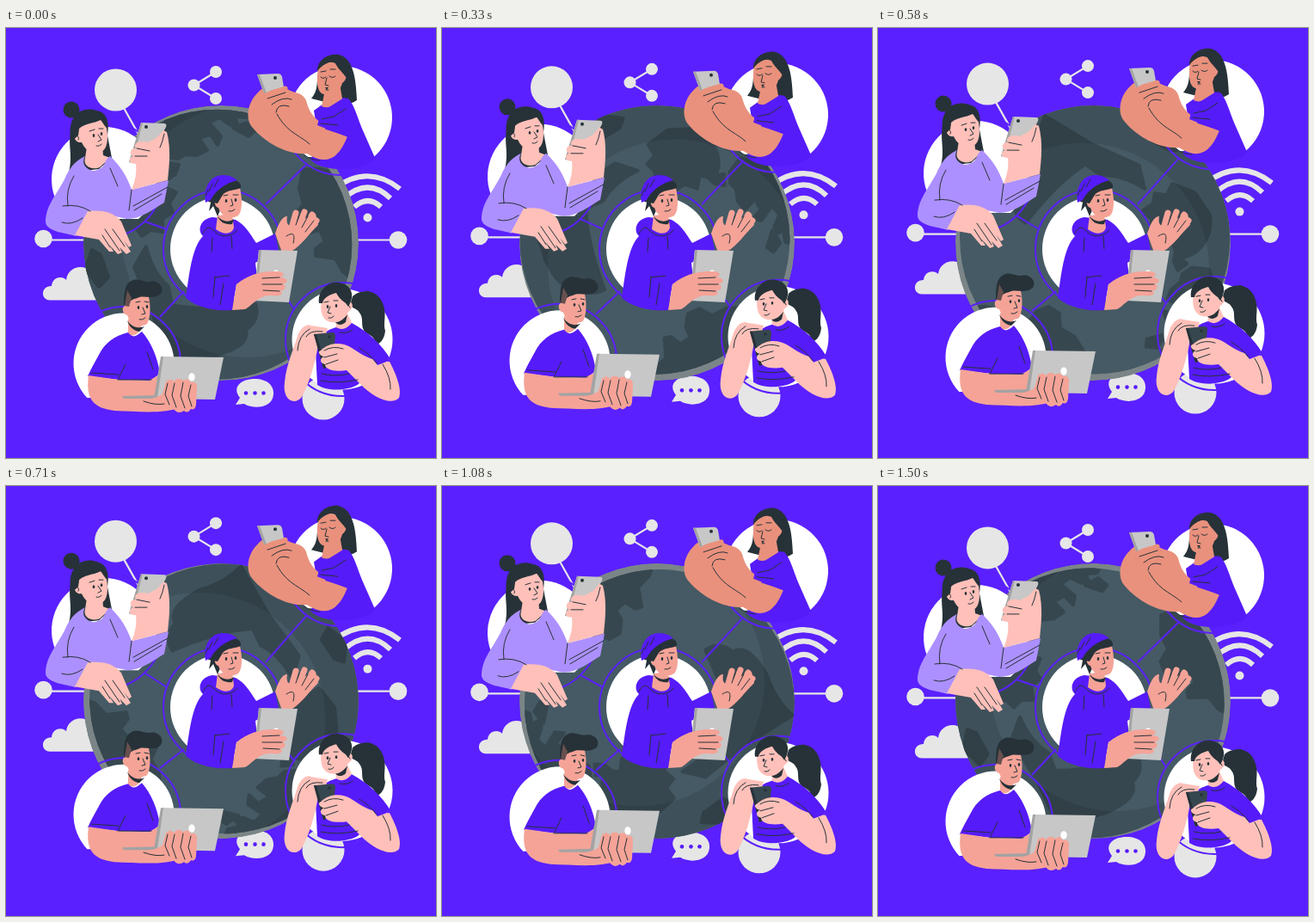
An HTML page for the animation above (1.54 s loop, 500 by 500 pixels).

```html
<!DOCTYPE html>
<html lang="en">
<head>
<meta charset="utf-8">
<title>Connected people</title>
<style>
html, body { margin: 0; width: 100%; height: 100%; overflow: hidden; background: #5a20ff }
svg { display: block; width: 100%; height: 100% }
.ink { fill: #263238 }
.line { fill: none; stroke: #263238; stroke-width: 1; stroke-linecap: round; stroke-linejoin: round }
.ring { fill: none; stroke: #5a20ff; stroke-width: 2 }
.top { fill: #561bf9 }
.lilac { fill: #ad90ff }
.white { fill: #fff }
.pale { fill: #e6e6e6 }
.wire { fill: none; stroke: #e6e6e6; stroke-width: 2.2 }
.wifi { fill: none; stroke: #e6e6e6; stroke-width: 6 }
.device { fill: #c7c7c7 }
.edge { fill: #a3a3a3 }
.pink { fill: #ffc0b9 }
.peach { fill: #f5a397 }
.tan { fill: #e9917d }
.land { fill: #37474f; stroke: #37474f; stroke-width: 4; stroke-linejoin: round }
.finger { fill: none; stroke: #f5a397; stroke-width: 7; stroke-linecap: round }
</style>
</head>
<body>
<svg viewBox="0 0 500 500">
<defs>
  <clipPath id="disc"><circle cx="250" cy="250" r="160"/></clipPath>
  <clipPath id="body"><circle cx="245.3" cy="251.7" r="157"/></clipPath>
</defs>

<g class="bob">
  <g class="pale">
    <circle cx="127.500" cy="72" r="24.500"/>
    <circle cx="43.500" cy="245" r="10.300"/>
    <circle cx="456" cy="246.500" r="10.300"/>
    <circle cx="244" cy="51" r="7"/><circle cx="218.500" cy="66.500" r="7"/><circle cx="244" cy="82" r="7"/>
    <circle cx="369" cy="431" r="24.500"/>
    <path d="M51 316.500C40 316 40 300 53 300C54 289 66 288 70 293C72 278 89 273 100 284L118 295V316.500Z"/>
    <path d="M267 438L272 430C262 417 274 408 289 408C304 408 312 416 311 426C310 442 288 444 277 437Z"/>
    <circle cx="420.500" cy="220.500" r="5"/>
  </g>
  <path class="wire" d="M137 93L160 134M43 246.500H110M390 246.500H456M244 51L218.500 66.500L244 82"/>
  <path class="wifi" d="M405 208Q421 194 436 208M393 198Q421 173 447 198M380 188Q420 157 458 187"/>
  <g class="top"><circle cx="279" cy="424.500" r="2.300"/><circle cx="289.500" cy="424.500" r="2.300"/><circle cx="299.500" cy="424.500" r="2.300"/></g>
</g>

<g id="globe" clip-path="url(#disc)">
  <circle cx="250" cy="250" r="160" fill="#7b8587"/>
  <g clip-path="url(#body)">
    <circle cx="250" cy="250" r="160" fill="#455a64"/>
    <g class="land">
      <path d="M186 108C210 94 240 90 258 93L284 98L280 104L266 103L270 115L259 112L248 104L236 110L250 126L246 136L238 124L224 128L234 142L222 148L208 147L200 152L187 150L174 135Z"/>
      <path d="M264 116L280 110L289 120L282 126Z"/>
      <path d="M188 157L201 159L197 170L188 176Z"/>
      <path d="M129 180C145 157 175 153 190 170L184 185L198 191L190 204L194 214L182 222L182 237L168 235L158 242L150 231L136 236L124 210Z"/>
      <path d="M345 165C366 160 384 168 394 181C408 207 410 250 403 292L392 284L383 268L360 265L360 257L371 248L365 235L353 238L338 232L335 218L346 205L341 187Z"/>
      <path d="M163 254Q170 284 189 301L193 322Q228 330 290 321Q296 339 279 351Q284 371 242 381Q210 382 188 396L171 333L149 278Z"/>
      <path d="M100 258L110 264L119 290L108 301L92 280Z"/>
    </g>
    <path fill="#000" fill-opacity=".1" fill-rule="evenodd" d="M85 85H440V415H85ZM133 236a147 147 0 1 0 294 0a147 147 0 1 0-294 0"/>
  </g>
</g>

<path id="links" class="ring"/>
<circle class="ring" cx="252" cy="257" r="69"/>
<circle class="white" cx="252" cy="257" r="61"/>

<!-- centre: man with tablet -->
<g>
  <path class="top" d="M240 220C226 222 222 235 229 242C216 255 213 287 209 314C226 328 249 329 263 328L268 298L292 290L290 273L317 258L313 239L291 250C283 238 278 229 267 223Z"/>
  <path class="peach" d="M246 218L244 234C253 241 263 240 265 232L263 216Z"/>
  <path class="ink" d="M246 219C252 226 260 226 265 222L263 228C255 229 249 226 246 219ZM239 198L252 188L249 212L246 219L241 207L236 213Z"/>
  <path class="peach" d="M249 195C255 189 266 187 272 186C275 199 275 213 270 218C263 223 250 220 247 209C242 208 240 197 249 195Z"/>
  <path class="ink" d="M235 202C240 190 250 182 260 178C268 175 274 180 273 186C266 189 257 188 252 194L246 204Z"/>
  <path class="top" d="M232 203C229 185 238 171 252 171C261 171 265 174 269 177C256 180 243 189 238 200Z"/>
  <g class="ink"><ellipse cx="256" cy="201" rx="1.300" ry="1.900"/><ellipse cx="267" cy="200" rx="1.300" ry="1.900"/></g>
  <path class="line" d="M253 195L258 194M264 194L270 194M262 199L264 206L261 207M259 213Q263 214 266 211M235 188L232 195M240 181L236 190M247 176L242 185M229 239C234 230 237 231 241 235C251 246 264 242 269 235M240 244L239 260M262 242L263 257M243 289L241 313M243 290L260 288M249 322L253 297"/>
  <path class="peach" d="M313 239C317 227 321 219 327 219C325 231 331 232 337 226L360 216L363 229C350 242 343 253 333 259L321 261Z"/>
  <path class="finger" d="M332 233L337 215M339 233L347 214M344 238L356 217M346 242L361 224"/>
  <path class="line" d="M337 229L341 218M344 232L351 219M348 237L358 224M326 242Q338 234 334 250"/>
  <path class="device" d="M294 258L339 259L329 319L288 317Z"/>
  <path class="edge" d="M294 258L297 258L291 317L288 317Z"/>
  <ellipse class="white" cx="314" cy="286" rx="3.500" ry="4.500"/>
  <path class="peach" d="M263 328L268 298C281 287 297 282 314 283C324 283 326 288 318 290C328 290 330 296 321 298C327 299 326 305 318 306C325 308 319 313 309 311C294 310 286 323 278 327Z"/>
  <path class="line" d="M298 291L318 290M298 298L321 298M299 305L318 306"/>
</g>

<g class="bob">
  <g class="ring">
    <circle cx="114" cy="176" r="68"/><circle cx="389" cy="104" r="67"/>
    <circle cx="137" cy="390" r="66"/><circle cx="391" cy="362" r="66"/>
  </g>
  <g class="white">
    <path d="M74 222A61 61 0 1 1 154 222Z"/>
    <path d="M350.500 150A60 60 0 1 1 427.500 150Z"/>
    <path d="M94.300 430A58.500 58.500 0 1 1 179.700 430Z"/>
    <circle cx="391" cy="362" r="58.500"/>
  </g>

  <!-- top left: woman with phone -->
  <g>
    <circle class="ink" cx="76" cy="95" r="9.500"/>
    <path class="ink" d="M75 122C76 102 91 92 105 96C119 98 120 112 118 125L123 151L108 164L73 168C78 148 72 137 75 122Z"/>
    <path class="pink" d="M94 138L92 151C89 160 99 166 109 162L121 151L113 148L112 136Z"/>
    <path class="pink" d="M85 114L109 104L116 112C120 128 118 142 110 144C100 147 92 142 88 133C79 134 77 123 84 122Z"/>
    <path class="ink" d="M76 132C72 115 77 102 86 97C99 91 115 95 118 117C114 114 113 110 110 107C102 111 91 111 85 117L84 125Z"/>
    <path class="lilac" d="M92 149C80 155 74 162 68 176C58 195 46 207 46 226C48 237 68 238 81 242L98 213L141 222C157 222 171 211 184 203L189 177L146 188C141 173 133 160 121 149C112 155 118 163 102 166C93 165 87 157 92 149Z"/>
    <path class="pink" d="M80 241L95 213C114 211 126 215 134 225L146 253L143 255L137 247L145 260L140 263L132 255L135 261L130 263L120 252L125 260L120 260L108 246Z"/>
    <path class="device" d="M157 110L184 111C187 111 187 114 185 117L163 158L143 156Z"/>
    <path class="edge" d="M157 110L159 110L147 157L143 156Z"/>
    <circle class="ink" cx="163" cy="115" r="2"/>
    <path class="pink" d="M183 119L187 121C192 140 190 159 188 177L146 188C151 177 152 166 151 158C142 158 142 151 148 149C142 146 145 139 151 140C147 133 157 130 165 133L176 127Z"/>
    <g class="ink"><ellipse cx="102" cy="125" rx="1.300" ry="1.900"/><ellipse cx="111" cy="123" rx="1.300" ry="1.900"/></g>
    <path class="line" d="M97 120L103 118M108 117L113 117M107 124L111 130L107 132M105 137Q109 138 111 135M82 125Q86 127 84 130M79 172Q69 188 72 207M121 163L130 184M146 188L143 212M66 207Q84 204 98 213M149 212L181 193M148 207L188 185M65 226Q76 230 89 221M150 149L164 149M152 140L167 143M184 123Q182 133 179 139M115 234L132 259M124 234L138 254M112 241L121 255"/>
  </g>

  <!-- top right: friend with phone -->
  <g>
    <path class="ink" d="M363 52C362 38 375 29 387 31C404 35 407 59 408 84C399 90 386 92 375 87L355 82C363 73 361 64 363 52Z"/>
    <path class="top" d="M358 96C368 89 373 85 380 80L398 82C405 89 409 105 414 117L429 151C420 166 370 170 354 153L364 133Z"/>
    <path class="tan" d="M371 72L367 91C375 95 386 89 391 82L388 65Z"/>
    <path class="tan" d="M363 48C370 38 383 37 388 46L392 53C397 51 397 60 391 64C388 76 379 80 369 77C361 74 361 60 363 48Z"/>
    <path class="ink" d="M362 50C362 36 376 29 386 32L400 42L399 62L392 53C388 49 384 44 382 39C374 39 368 43 362 50Z"/>
    <path class="tan" d="M293 75C281 86 278 105 286 115C303 136 331 148 350 146C369 158 385 157 397 126L366 116C352 103 343 89 340 77L322 69C311 65 300 67 293 75Z"/>
    <path class="device" d="M292 54L316 53Q320 53 321 57L324 74L300 76Z"/>
    <path class="edge" d="M292 54L295 54L303 76L300 76Z"/>
    <circle class="ink" cx="313" cy="58" r="2"/>
    <path class="tan" d="M298 78C307 71 319 70 323 68C327 66 330 71 325 75C335 72 349 77 350 88C354 101 361 108 374 114L356 135C338 120 324 114 314 100C306 96 306 91 309 89C298 91 302 84 306 82Z"/>
    <path class="top" d="M362 113L366 98L390 83C402 88 406 98 405 111L398 127Z"/>
    <path class="line" d="M366 57Q369 60 372 57M376 56Q380 59 383 56M366 51L372 50M377 48L383 48M373 58L371 66L375 67M372 72L375 72M304 82L325 75M309 89Q322 79 332 83M314 98Q315 87 329 91M315 100C327 122 341 124 353 135M347 148Q356 154 365 154M395 94L381 103L367 106M366 111L386 113"/>
    <path class="ink" d="M371 69L375 69L373 72Z"/>
  </g>

  <!-- bottom left: man with laptop -->
  <g>
    <path class="peach" d="M142 338L142 356C149 360 156 355 158 345Z"/>
    <path class="ink" d="M141 340C146 348 154 350 161 347L155 353C148 352 143 347 141 340Z"/>
    <path class="top" d="M142 354C126 358 115 366 108 380C103 389 99 396 95 405L131 409L168 410L179 402C176 382 169 366 158 353C150 360 147 360 142 354Z"/>
    <path class="peach" d="M143 311L165 309C169 322 168 338 164 344C156 349 145 345 141 334C134 333 134 321 141 323Z"/>
    <path class="ink" d="M137 322C137 309 138 297 146 294C153 290 159 295 166 295C177 292 185 302 180 309C172 316 162 311 155 313C148 316 144 315 142 323Z"/>
    <path fill="#69504f" d="M138 323L141 305L146 314L143 324Z"/>
    <path class="peach" d="M96 404L131 409L166 410L179 403L197 409L203 441C184 449 155 446 126 445C103 442 92 433 96 404Z"/>
    <path class="edge" d="M135 428L178 427L179 431L137 431Z"/>
    <path class="edge" d="M180 382L184 382L176 431L172 430Z"/>
    <path class="device" d="M183 382L253 383L243 432L176 431Z"/>
    <ellipse class="white" cx="216" cy="406" rx="3.700" ry="4.700"/>
    <path class="peach" d="M160 434C168 430 178 430 182 425L186 411Q191 406 195 411Q200 405 206 410Q212 406 215 412Q222 410 222 418L221 438Q220 445 215 443Q211 449 207 445Q200 450 195 443C182 445 162 443 160 434Z"/>
    <g class="ink"><ellipse cx="154" cy="325" rx="1.300" ry="1.900"/><ellipse cx="164" cy="324" rx="1.300" ry="1.900"/></g>
    <path class="line" d="M151 319L156 318M161 318L166 319M159 325L162 332L158 333M155 339Q159 340 162 337M130 409L139 391M99 401L131 403M164 377L171 397M131 409L169 409M160 434Q174 439 184 437M188 413L185 426L190 438M196 413L193 427L198 441M206 412L203 428L208 442M215 415L212 428L216 440"/>
  </g>

  <!-- bottom right: woman with phone -->
  <g>
    <path class="ink" d="M403 312C412 304 430 303 437 318C444 332 438 342 441 352C440 363 434 368 427 370C432 361 425 358 418 354C411 347 417 338 411 331C407 324 401 328 401 319Z"/>
    <path class="pink" d="M383 336L384 351C392 358 401 350 403 345L397 332Z"/>
    <path class="ink" d="M382 341C389 340 394 337 397 333L395 342C390 346 386 346 382 341Z"/>
    <path class="top" d="M384 348C370 352 362 359 360 376L362 415C374 423 399 422 410 414L425 390L447 385C437 368 421 353 402 343C396 350 391 352 384 348Z"/>
    <path class="pink" d="M367 314L386 305L395 320C402 314 407 325 398 330C394 340 385 344 377 342C366 339 365 326 367 314Z"/>
    <path class="ink" d="M364 320C362 306 374 294 387 296C401 298 407 310 398 324L395 320C389 316 386 312 384 308C377 310 369 313 368 320Z"/>
    <path class="pink" d="M339 358C342 349 350 343 355 346L374 349L372 357L359 358L363 369C359 392 353 412 344 429C335 440 321 432 324 412C326 391 334 375 339 358Z"/>
    <path fill="#37474f" d="M358 356L379 354Q383 354 383 358L379 392L369 396Z"/>
    <path class="ink" d="M358 356L361 356L372 395L369 396Z"/>
    <circle class="ink" cx="376" cy="359" r="1.700"/>
    <path class="pink" d="M366 375C376 365 391 365 402 372C417 382 427 388 446 388C453 401 461 420 457 430C447 440 427 428 416 418L396 398C384 400 371 398 371 391C364 390 365 383 370 382C364 381 362 376 366 375Z"/>
    <path class="top" d="M414 369C429 361 440 375 445 387L432 392Z"/>
    <g class="ink"><ellipse cx="374" cy="324" rx="1.300" ry="1.900"/><ellipse cx="384" cy="323" rx="1.300" ry="1.900"/></g>
    <path class="line" d="M370 319L375 318M381 317L386 317M377 324L374 331L378 332M375 337Q379 338 381 335M397 320L400 325M339 375Q340 357 353 350M349 359Q353 351 368 353M370 383L385 379M372 391L386 386M370 375Q380 369 392 373M438 391Q448 407 447 420M411 372Q423 379 431 390M367 402Q383 406 399 402M366 410Q386 414 409 409M388 354Q396 356 403 351M420 306Q433 309 435 323"/>
  </g>
</g>
</svg>
<script>
const LOOP = 1540, STEPS = 37;
const globe = document.getElementById('globe');
const links = document.getElementById('links');
const bobbing = document.querySelectorAll('.bob');

// Centre ring anchor, then the anchor on the bobbing outer ring
const joints = [[302, 205, 350, 158], [187, 234, 161, 225], [207, 306, 179, 336], [312, 292, 335, 327]];

function draw(now) {
  const phase = Math.floor((now % LOOP) / LOOP * STEPS + 0.1) / STEPS;
  const lift = -4 * (1 - Math.cos(phase * 2 * Math.PI));
  bobbing.forEach(g => g.setAttribute('transform', `translate(0 ${lift})`));
  globe.setAttribute('transform', `rotate(${phase * 360} 250 250)`);
  links.setAttribute('d', joints.map(([x, y, u, v]) => `M${x} ${y}L${u} ${v + lift}`).join(''));
  requestAnimationFrame(draw);
}
draw(performance.now());
</script>
</body>
</html>
```
